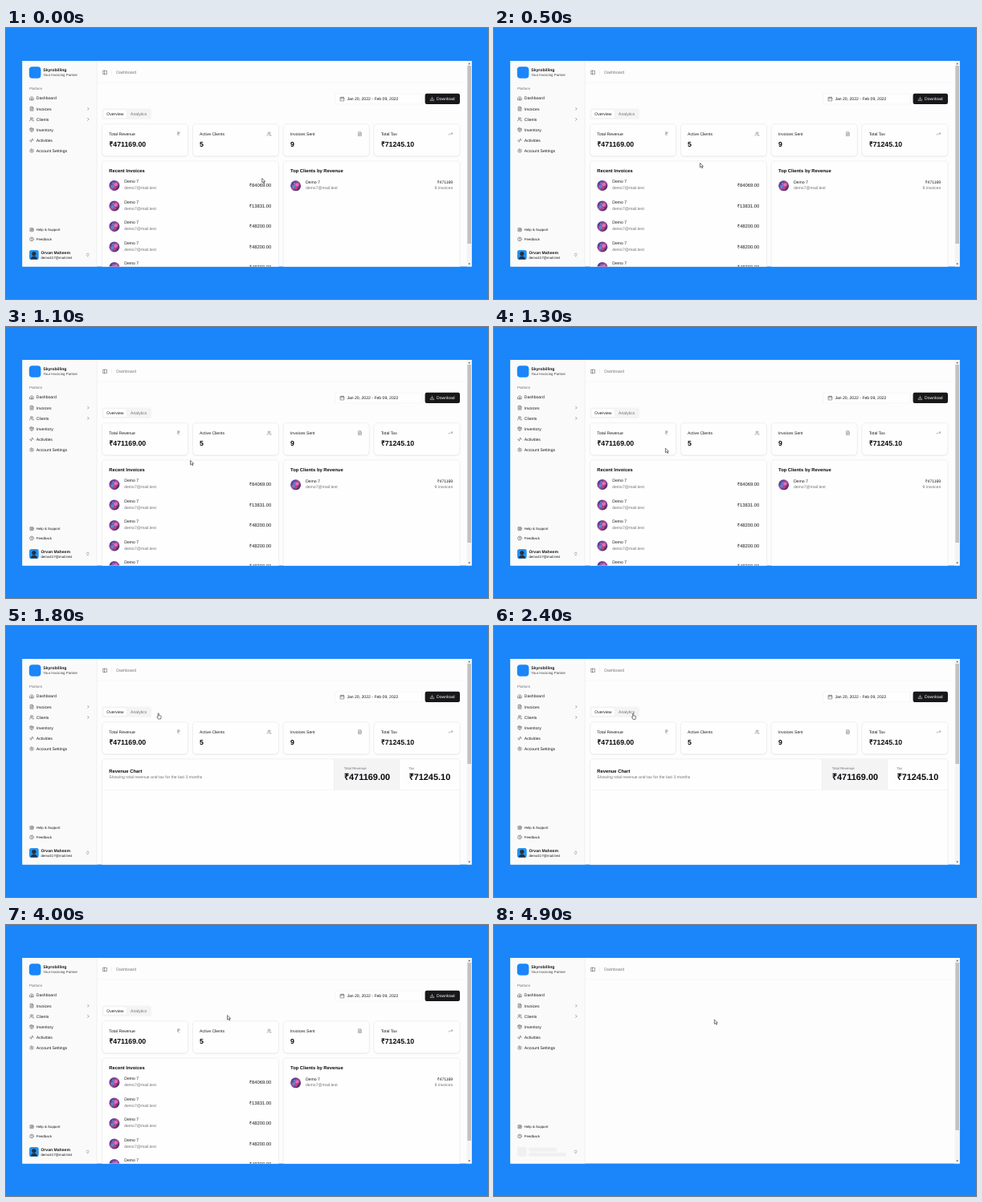
These frames come from a looping animation (600 px wide and 338 px high, 5 s). An HTML page with a canvas:

```html
<!DOCTYPE html>
<html lang="en">
<head>
<meta charset="utf-8">
<title>Invoicing dashboard</title>
<style>
  html, body { margin: 0; width: 100%; height: 100%; overflow: hidden; background: #1a86fa; }
  canvas { display: block; width: 600px; height: 338px; }
</style>
</head>
<body>
<canvas id="stage"></canvas>
<script>
const canvas = document.getElementById('stage');
const ctx = canvas.getContext('2d');
const ratio = window.devicePixelRatio || 1;
canvas.width = 600 * ratio;
canvas.height = 338 * ratio;

const LOOP = 5000, STEP = 100;
const UNIT = 560 / 1536; // stage pixels per interface pixel
const INK = '#18181b', MUTED = '#71717a', LINE = '#e4e4e7', SOFT = '#f4f4f5';

// Icons on a 24 x 24 grid
const ICONS = {
  home: 'M3 10l9-7 9 7v11H3zM9 21v-9h6v9',
  file: 'M14 2H4v20h16V8zM14 2v6h6M8 13h8M8 17h8M8 9h2',
  users: 'M2 21v-2a4 4 0 0 1 4-4h6a4 4 0 0 1 4 4v2M13 7a4 4 0 1 1-8 0a4 4 0 1 1 8 0M22 21v-2a4 4 0 0 0-3-3.9M16 3.1a4 4 0 0 1 0 7.8',
  box: 'M12 2l9 5v10l-9 5-9-5V7zM3 7l9 5 9-5M12 12v10M7.5 4.5l9 5',
  activity: 'M2 12h4l3 9 6-18 3 9h4',
  settings: 'M12 2l3 3 4 0 1 4 2 3-2 3-1 4-4 0-3 3-3-3-4 0-1-4-2-3 2-3 1-4 4 0zM15 12a3 3 0 1 1-6 0a3 3 0 1 1 6 0',
  support: 'M22 12a10 10 0 1 1-20 0a10 10 0 1 1 20 0M16 12a4 4 0 1 1-8 0a4 4 0 1 1 8 0M5 5l4 4M15 9l4-4M15 15l4 4M9 15l-4 4',
  help: 'M22 12a10 10 0 1 1-20 0a10 10 0 1 1 20 0M9 9a3 3 0 0 1 6 1c0 2-3 2-3 4M12 17v.5',
  panel: 'M3 3h18v18H3zM9 3v18',
  calendar: 'M3 4h18v18H3zM3 10h18M8 2v4M16 2v4',
  download: 'M21 15v6H3v-6M7 10l5 5 5-5M12 15V3',
  rupee: 'M6 3h12M6 8h12M6 13l8.5 8M6 13h3c6.7 0 6.7-10 0-10',
  trend: 'M22 7l-8.5 8.5-5-5L2 17M16 7h6v6',
  right: 'M9 18l6-6-6-6',
  upDown: 'M7 15l5 5 5-5M7 9l5-5 5 5'
};
for (const name in ICONS) ICONS[name] = new Path2D(ICONS[name]);
const ARROW = new Path2D('M0 0V5.4L1.4 4.2L2.4 6.3L3.3 5.9L2.4 3.8H4z');
const HAND = new Path2D('M-.5 .5Q0-.4.5.5V3L3 3.5Q3.6 3.8 3.4 5L2.8 7.5H-.3L-1.8 4.8Q-1.6 4-.5 4.8z');

// Each point: time, x, y
const CURSOR = [
  [0, 318.7, 187.5], [500, 256.5, 168.5], [800, 256.5, 168.5], [1100, 229.5, 166.5],
  [1200, 228.5, 166], [1600, 168, 107], [1800, 189.7, 108.5], [2200, 189.7, 108.5],
  [2800, 140.3, 109.5], [3500, 140.3, 109.5], [4000, 275.5, 112.7], [4100, 275.5, 112.7],
  [4300, 274.5, 115], [4700, 274.5, 115], [4900, 274.3, 118]
];
const SCROLL = [[600, 0], [700, 4], [800, 9.6], [900, 9.6], [1000, 4], [1100, 0]];

function track(points, t) {
  const next = points.findIndex(p => p[0] > t);
  if (next < 0) return points[points.length - 1].slice(1);
  if (next === 0) return points[0].slice(1);
  const a = points[next - 1], b = points[next];
  const k = (t - a[0]) / (b[0] - a[0]);
  return a.slice(1).map((v, i) => v + (b[i + 1] - v) * k);
}

function rect(x, y, w, h, fill) {
  ctx.fillStyle = fill;
  ctx.fillRect(x, y, w, h);
}

function round(x, y, w, h, r, fill, border) {
  ctx.beginPath();
  ctx.roundRect(x, y, w, h, r);
  ctx.fillStyle = fill;
  ctx.fill();
  if (border) {
    ctx.strokeStyle = border;
    ctx.lineWidth = 0.5;
    ctx.stroke();
  }
}

function disc(x, y, r, fill) {
  ctx.beginPath();
  ctx.arc(x, y, r, 0, 7);
  ctx.fillStyle = fill;
  ctx.fill();
}

// y is the middle of the capital letters
function text(str, x, y, size = 14, color = INK, weight = '', align = 'left') {
  const px = size * UNIT;
  ctx.font = `${weight} ${px}px "Liberation Sans", Arial, sans-serif`;
  ctx.textRendering = 'geometricPrecision';
  ctx.textAlign = align;
  ctx.fillStyle = color;
  ctx.fillText(str, x, y + px * 0.36);
}

function icon(name, x, y, color = '#3f3f46', size = 16) {
  ctx.save();
  ctx.translate(x, y);
  ctx.scale(size * UNIT / 24, size * UNIT / 24);
  ctx.translate(-12, -12);
  ctx.strokeStyle = color;
  ctx.lineWidth = 2;
  ctx.lineCap = ctx.lineJoin = 'round';
  ctx.stroke(ICONS[name]);
  ctx.restore();
}

function card(x, y, w, h) {
  ctx.save();
  ctx.shadowColor = 'rgba(0,0,0,.14)';
  ctx.shadowBlur = 1.2 * ratio;
  ctx.shadowOffsetY = 0.5 * ratio;
  round(x, y, w, h, 4.4, '#fff');
  ctx.restore();
  round(x, y, w, h, 4.4, '#fefefe', LINE);
}

function clipped(x, y, w, h, draw) {
  ctx.save();
  ctx.beginPath();
  ctx.rect(x, y, w, h);
  ctx.clip();
  draw();
  ctx.restore();
}

function clientAvatar(x, y) {
  const tint = ctx.createLinearGradient(x - 5, y - 5, x + 5, y + 5);
  tint.addColorStop(0, '#3d3a8c');
  tint.addColorStop(0.5, '#a9509f');
  tint.addColorStop(1, '#3b2462');
  disc(x, y, 6.5, tint);
  disc(x - 2.2, y + 1.2, 2.1, '#4d8fd0');
  disc(x + 1.8, y - 1.2, 2.2, '#e86fa5');
  disc(x + 0.6, y + 2.8, 1.8, '#c93f78');
  disc(x - 1.4, y - 2.6, 1.3, '#8c6fd8');
}

function client(x, y) {
  clientAvatar(x + 6.6, y);
  text('Demo 7', x + 18.9, y - 5);
  text('demo7@mail.test', x + 18.9, y + 2.8, 14, MUTED);
}

function sidebar(loading) {
  rect(20, 41, 93, 257, '#fafafa');
  rect(112.8, 41, 0.5, 257, LINE);
  round(28.8, 48.2, 14.6, 14.6, 4, '#1a86fa');
  text('Skyrobilling', 46.3, 52.4, 14, INK, 'bold');
  text('Your Invoicing Partner', 46.3, 58.8, 12, '#3f3f46');
  text('Platform', 29, 75.8, 12, MUTED);

  const items = [['home', 'Dashboard'], ['file', 'Invoices'], ['users', 'Clients'],
    ['box', 'Inventory'], ['activity', 'Activities'], ['settings', 'Account Settings']];
  items.forEach(([name, label], i) => {
    const y = 87.6 + i * 13.12;
    icon(name, 32, y);
    text(label, 37.8, y);
    if (i === 1 || i === 2) icon('right', 102.4, y);
  });
  icon('support', 32, 251.6);
  text('Help & Support', 37.8, 251.6, 12);
  icon('help', 32, 263.4);
  text('Feedback', 37.8, 263.4, 12);
  icon('upDown', 101.7, 282.8);

  if (loading) {
    round(29, 277, 11.6, 11.8, 2, '#f0f0f1');
    round(43.4, 277.8, 35, 4.8, 1.2, '#f0f0f1');
    round(43.4, 284, 46.5, 4.4, 1.2, '#f0f0f1');
    return;
  }
  round(29, 277, 11.7, 11.8, 2.6, '#2492ee');
  clipped(29, 277, 11.7, 11.4, () => {
    disc(34.8, 281.6, 2.6, '#26303f');
    disc(34.8, 289, 4.4, '#26303f');
  });
  text('Orvan Maheem', 43.4, 279.8, 14, INK, 'bold');
  text('demo417@mail.test', 43.4, 286.2, 12);
}

function header() {
  icon('panel', 123.3, 55.4);
  rect(131, 52.4, 0.4, 5.8, LINE);
  text('Dashboard', 137.2, 55.4, 14, MUTED);
  rect(113, 67.8, 459, 0.4, '#ececee');
}

function toolbar() {
  round(409.5, 82, 108.6, 13, 2, '#fefefe', '#ececee');
  icon('calendar', 418.6, 88.5);
  text('Jan 20, 2022 - Feb 09, 2022', 424.4, 88.5);
  round(521.6, 81.8, 43.4, 13.2, 2.2, INK);
  icon('download', 530.4, 88.4, '#fff');
  text('Download', 536, 88.4, 14, '#fff');

  round(119.6, 100.6, 61.4, 13.2, 2.6, SOFT);
  round(121, 102, 29.4, 10.4, 2, '#fff', '#ebebed');
  text('Overview', 125.2, 107.2);
  text('Analytics', 155, 107.2, 14, MUTED);
}

function stats() {
  const cards = [['Total Revenue', '₹471169.00', 'rupee'], ['Active Clients', '5', 'users'],
    ['Invoices Sent', '9', 'file'], ['Total Tax', '₹71245.10', 'trend']];
  cards.forEach(([label, value, name], i) => {
    const x = 119.6 + i * 112.8;
    card(x, 119.7, 107, 40);
    text(label, x + 8.7, 132.2);
    icon(name, x + 95.2, 132.2, MUTED);
    text(value, x + 8.7, 144.8, 24, '#09090b', 'bold');
  });
}

function overview() {
  card(119.6, 165.8, 219.8, 152);
  card(345.2, 165.8, 219.8, 152);
  text('Recent Invoices', 128.3, 177.6, 16, '#09090b', 'bold');
  text('Top Clients by Revenue', 354, 177.6, 16, '#09090b', 'bold');
  ['84069', '13831', '48200', '48200', '48200'].forEach((amount, i) => {
    const y = 196.4 + i * 25.5;
    client(128.3, y);
    text(`₹${amount}.00`, 330.3, y - 0.2, 16, INK, '', 'right');
  });
  client(354, 196.8);
  text('₹471169', 556.2, 192.4, 14, INK, '', 'right');
  text('9 invoices', 556.2, 199.5, 14, MUTED, '', 'right');
}

function analytics() {
  card(119.6, 165.8, 445.4, 180);
  rect(408, 166, 81.4, 38, SOFT);
  rect(408, 166, 0.4, 38, LINE);
  rect(489.4, 166, 0.4, 38, LINE);
  rect(119.6, 204, 445.4, 0.4, LINE);
  text('Revenue Chart', 128.3, 180.6, 16, '#09090b', 'bold');
  text('Showing total revenue and tax for the last 3 months', 128.3, 188, 14, MUTED);
  text('Total Revenue', 420.8, 177.6, 12, MUTED);
  text('₹471169.00', 420.8, 188.4, 30, '#09090b', 'bold');
  text('Tax', 501.4, 177.6, 12, MUTED);
  text('₹71245.10', 501.4, 188.4, 30, '#09090b', 'bold');
}

function triangle(x, y, dir) {
  ctx.beginPath();
  ctx.moveTo(x - 1.4, y + dir * 0.8);
  ctx.lineTo(x + 1.4, y + dir * 0.8);
  ctx.lineTo(x, y - dir * 0.8);
  ctx.fillStyle = '#505050';
  ctx.fill();
}

function scrollbar(top, height) {
  rect(573.6, 41, 6, 257, '#f4f4f4');
  rect(574.4, top, 4.6, height, '#c1c1c1');
  triangle(576.7, 44.4, 1);
  triangle(576.7, 294.4, -1);
}

function pointer(x, y, hand) {
  ctx.save();
  ctx.translate(x, y);
  ctx.fillStyle = '#fff';
  ctx.strokeStyle = '#222';
  ctx.lineWidth = 0.6;
  ctx.lineJoin = 'round';
  const shape = hand ? HAND : ARROW;
  ctx.fill(shape);
  ctx.stroke(shape);
  ctx.restore();
}

function draw(t) {
  const loading = t >= 4500;
  const onAnalytics = t >= 1600 && t < 2900;
  const [scroll] = track(SCROLL, t);
  const [x, y] = track(CURSOR, t);

  ctx.setTransform(ratio, 0, 0, ratio, 0, 0);
  rect(0, 0, 600, 338, '#1a86fa');
  clipped(20.4, 41, 559.4, 256.6, () => {
    rect(20, 41, 560, 257, '#fdfdfd');
    ctx.save();
    ctx.translate(0, -scroll);
    header();
    if (!loading) {
      toolbar();
      stats();
      onAnalytics ? analytics() : overview();
    }
    ctx.restore();
    sidebar(loading);
    const thumb = onAnalytics ? 125 : loading ? 209 : 222;
    scrollbar(47 + scroll * 0.86, thumb);
  });
  pointer(x, y, t >= 1500 && t < 3600);
}

function frame() {
  const t = performance.now() % LOOP;
  draw(Math.floor(t / STEP) * STEP);
  requestAnimationFrame(frame);
}
frame();
</script>
</body>
</html>
```
